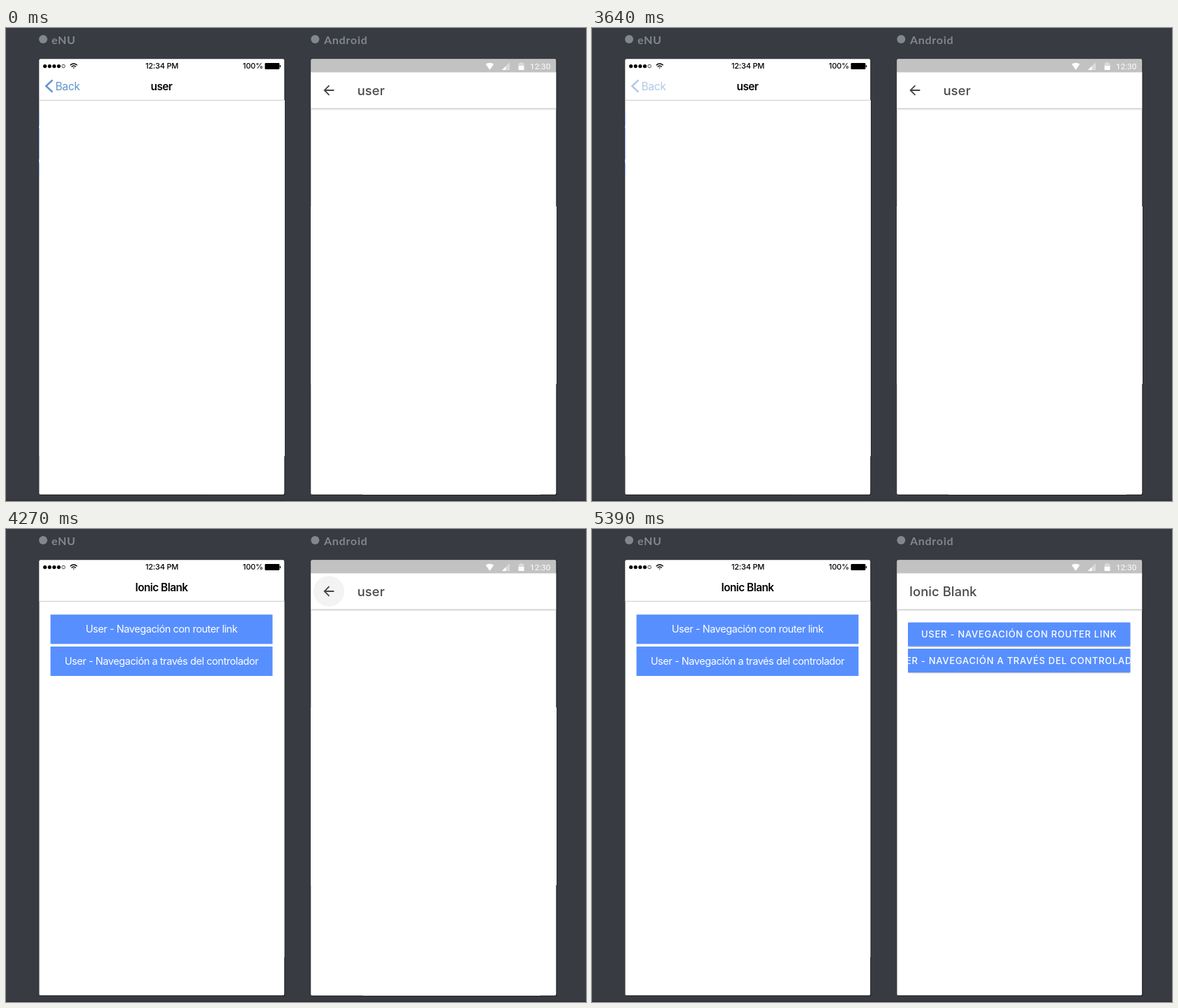
Write an HTML page that moves like this. It is 828 by 676 pixels and loops after 6020 ms.

```html
<!DOCTYPE html>
<html lang="es">
<head>
<meta charset="utf-8">
<title>Page navigation on two phones</title>
<style>
html, body { margin: 0; width: 100%; height: 100%; overflow: hidden; background: #383b42; }
svg { display: block; width: 828px; height: 676px; }
text { font-family: Inter, "Noto Sans", sans-serif; }
.caption { font: 700 16px Lato, sans-serif; letter-spacing: .7px; fill: #82868d; }
.mid { text-anchor: middle; }
.clock { font-size: 11px; font-weight: 500; letter-spacing: -.2px; }
.title { font-size: 15.3px; font-weight: 600; letter-spacing: -.5px; }
.back { font-size: 15.5px; letter-spacing: -.3px; fill: #6293cf; }
.label { font-size: 14.5px; letter-spacing: -.43px; fill: #fff; }
.heading { font-size: 18.4px; font-weight: 500; letter-spacing: .05px; fill: #4a4a4a; }
.caps { font-size: 13px; font-weight: 500; letter-spacing: .72px; fill: #fff; }
.button { fill: #588fff; }

/* One loop for all parts; the script steps the clock. */
.move { animation: 6020ms cubic-bezier(.36, .66, .04, 1) infinite paused; }
.page-in { animation-name: page-in; }
.page-out { animation-name: page-out; }
.shade { animation-name: shade; }
.title-in { animation-name: title-in; animation-timing-function: cubic-bezier(.35, .4, .3, 1); }
.back-fade { animation-name: back-fade; animation-timing-function: linear; }
.hover { animation-name: hover; animation-timing-function: linear; }
.ripple { animation-name: ripple; animation-timing-function: ease-out; transform-origin: 461px 89px; }
.drop { animation-name: drop; animation-timing-function: cubic-bezier(.47, 0, .745, .715); }

@keyframes page-in {
  0%, 60.71% { transform: translateX(-115px); }
  69.68%, 100% { transform: none; }
}
@keyframes page-out {
  0%, 60.71% { transform: none; }
  69.68%, 100% { transform: translateX(350px); }
}
@keyframes shade {
  0%, 60.71% { opacity: .12; }
  69.68%, 100% { opacity: 0; }
}
@keyframes title-in {
  0%, 60.71% { opacity: 0; }
  69.68%, 100% { opacity: 1; }
}
@keyframes back-fade {
  0%, 33.72% { opacity: 1; }
  41.86%, 56.98% { opacity: .65; }
  60.47%, 60.71% { opacity: .5; }
  62.6%, 100% { opacity: 0; }
}
@keyframes hover {
  0%, 67.44% { opacity: 0; }
  70.93%, 100% { opacity: 1; }
}
@keyframes ripple {
  0%, 84.85% { opacity: 0; transform: scale(.6); }
  84.87% { opacity: 1; transform: scale(.6); }
  87.2%, 100% { opacity: 1; transform: none; }
}
@keyframes drop {
  0%, 86.04% { opacity: 1; transform: none; }
  89.53%, 100% { opacity: 0; transform: translateY(37px); }
}
</style>
</head>
<body>
<svg viewBox="0 0 828 676">
  <defs>
    <clipPath id="left"><rect x="47.5" y="44.5" width="349.7" height="622" rx="1.5"/></clipPath>
    <clipPath id="right"><rect x="435.5" y="44.5" width="349.7" height="622" rx="1.5"/></clipPath>
    <clipPath id="wide"><rect x="451" y="171" width="317.5" height="34"/></clipPath>
    <g id="bar">
      <rect x="435" y="63" width="351" height="52" fill="#fff"/>
      <rect x="435" y="114.6" width="351" height="1.2" fill="#c6c6c6"/>
      <rect x="435" y="115.8" width="351" height="1.4" fill="#ebebeb"/>
    </g>
  </defs>

  <rect width="828" height="676" fill="#383b42"/>
  <rect y="674.5" width="828" height="1.5" fill="#302f37"/>

  <circle cx="53" cy="16" r="6" fill="#82868d"/>
  <text class="caption" x="65" y="22.5">eNU</text>
  <circle cx="441.3" cy="16" r="6" fill="#82868d"/>
  <text class="caption" x="454" y="22.5">Android</text>

  <rect x="48" y="45" width="350.2" height="622.4" rx="1.5" fill="#0d0e11"/>
  <g clip-path="url(#left)">
    <rect x="47" y="44" width="351" height="623" fill="#fff"/>
    <g class="move page-in">
      <rect class="button" x="63.5" y="122.3" width="317" height="42"/>
      <rect class="button" x="63.5" y="168" width="317" height="42"/>
      <text class="label mid" x="222" y="148.2">User - Navegación con router link</text>
      <text class="label mid" x="222" y="194.2">User - Navegación a través del controlador</text>
      <rect class="move shade" x="47" y="103" width="351" height="564"/>
    </g>
    <rect class="move page-out" x="47.5" y="103" width="351" height="564" fill="#fff"/>

    <rect x="47" y="44" width="351" height="59" fill="#fff"/>
    <rect x="47" y="102.8" width="351" height="1" fill="#cbcbcb"/>
    <g class="move page-in"><text class="title mid move title-in" x="222" y="88.6">Ionic Blank</text></g>
    <text class="title mid move page-out" x="222" y="88.6">user</text>
    <g class="move back-fade">
      <path d="M66.4 74.4L57.2 83l9.2 8.6" fill="none" stroke="#6293cf" stroke-width="2.5"/>
      <text class="back" x="70.5" y="88.6">Back</text>
    </g>

    <path d="M55.6 54.6h20" stroke="#000" stroke-width="5.2" stroke-linecap="round" stroke-dasharray="0 6.6"/>
    <circle cx="82" cy="54.6" r="2.3" fill="none" stroke="#000" stroke-width=".7"/>
    <g fill="none" stroke="#000" stroke-width="1.4">
      <path d="M91.6 53.3q5-4.4 10 0M93.5 55.4q3.1-2.8 6.2 0"/>
      <path d="M95.2 56.5h2.8l-1.4 1.5z" fill="#000" stroke="none"/>
    </g>
    <text class="clock mid" x="222.5" y="58.3">12:34 PM</text>
    <text class="clock" x="367" y="58.3" text-anchor="end">100%</text>
    <rect x="369.6" y="50" width="20.8" height="9" rx="1.2"/>
    <rect x="390.8" y="53" width="1.4" height="3.2" rx=".6"/>
  </g>

  <rect x="436" y="45" width="350.2" height="622.4" rx="1.5" fill="#0d0e11"/>
  <g clip-path="url(#right)">
    <rect x="435" y="44" width="351" height="623" fill="#fff"/>
    <use href="#bar"/>
    <text class="heading" x="453" y="96.3">Ionic Blank</text>
    <g fill="#c9cbd1">
      <rect x="451" y="135" width="317.5" height="34" rx="1"/>
      <rect x="451" y="172.3" width="317.5" height="34" rx="1"/>
    </g>
    <rect class="button" x="451" y="133.6" width="317.5" height="34" rx="1"/>
    <rect class="button" x="451" y="171" width="317.5" height="34" rx="1"/>
    <text class="caps mid" x="609.7" y="155.2">USER - NAVEGACIÓN CON ROUTER LINK</text>
    <g clip-path="url(#wide)">
      <text class="caps mid" x="609.7" y="192.6">USER - NAVEGACIÓN A TRAVÉS DEL CONTROLADOR</text>
    </g>

    <g class="move drop">
      <rect x="435" y="63" width="351" height="604" fill="#fff"/>
      <use href="#bar"/>
      <circle class="move hover" cx="461" cy="89" r="22" fill="#f3f3f3"/>
      <circle class="move ripple" cx="461" cy="89" r="22" fill="#e0e0e0"/>
      <path d="M468.3 89H455M461.4 82.2L454.6 89l6.8 6.8" fill="none" stroke="#444" stroke-width="1.8"/>
      <text class="heading" x="501.5" y="96.3">user</text>
    </g>

    <rect x="435" y="44" width="351" height="19.4" fill="#c2c2c2"/>
    <g fill="#fff">
      <path d="M684.8 51.6q5.8-3.8 11.6 0L690.6 60z"/>
      <path d="M708 60l11-11v11z" opacity=".4"/>
      <path d="M708 60l5.5-5.5V60z"/>
      <path d="M731.6 50.2h2v-1.2h4v1.2h2V54h-8z" opacity=".4"/>
      <rect x="731.6" y="54" width="8" height="6"/>
      <text x="748" y="58.6" style="font: 11.8px Roboto, sans-serif">12:30</text>
    </g>
  </g>
</svg>
<script>
const LOOP = 6020, TICK = 70;
const parts = document.getAnimations();

function draw() {
  const time = Math.floor(performance.now() % LOOP / TICK) * TICK;
  for (const part of parts) part.currentTime = time;
  requestAnimationFrame(draw);
}
draw();
</script>
</body>
</html>
```
